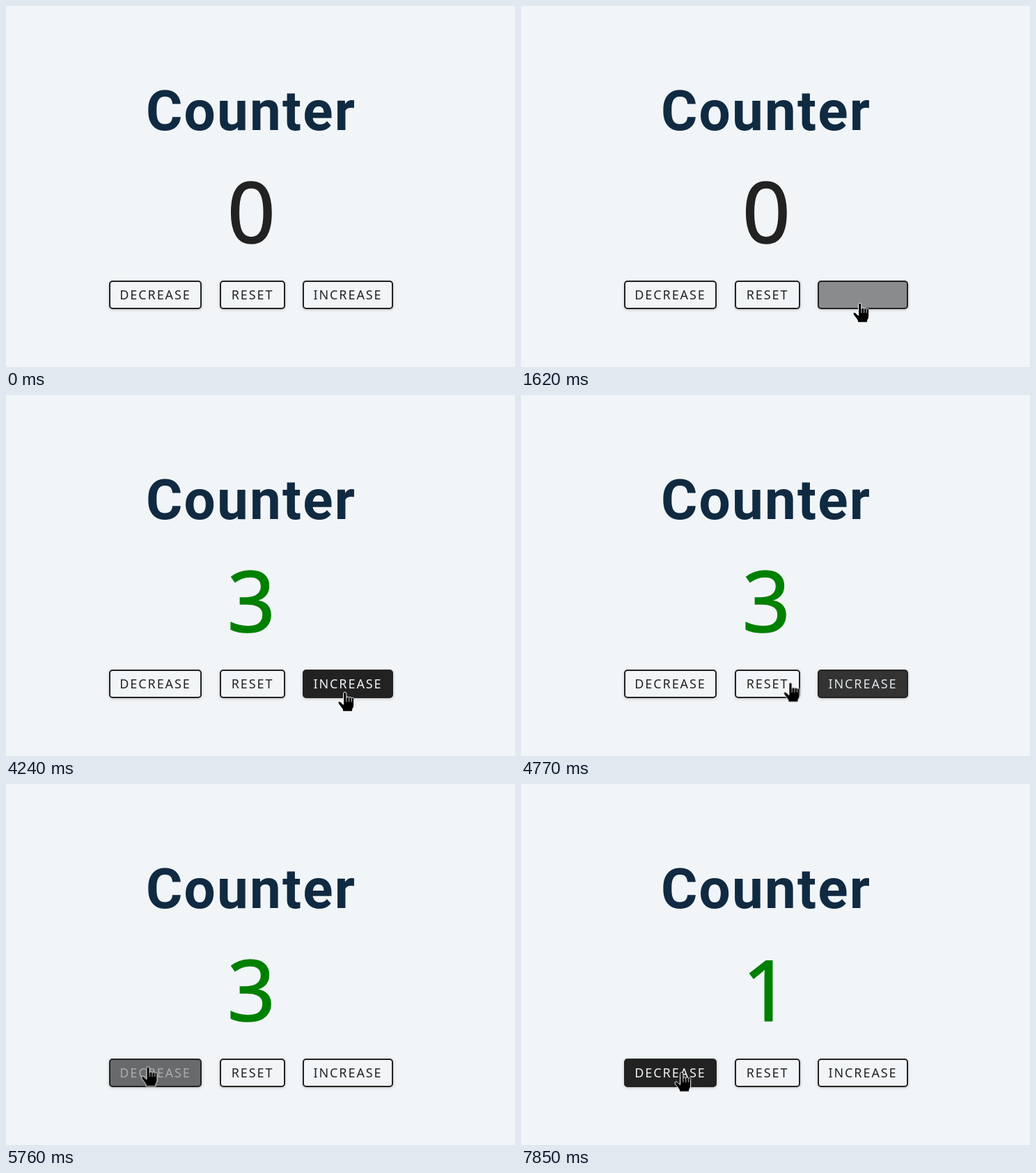
An HTML page that plays this animation: 731x518 px, repeating every 8 s.

```html
<!DOCTYPE html>
<html lang="en">
<head>
<meta charset="utf-8">
<title>Counter</title>
<style>
  :root { --paper: #f1f5f8; --ink: #222; --loop: 8s infinite; }
  html, body { margin: 0; width: 100%; height: 100%; overflow: hidden; background: var(--paper); }
  svg { position: absolute; left: 0; top: 0; }
  text { text-anchor: middle; }

  .title { font: 700 80px Roboto, sans-serif; letter-spacing: 2.2px; fill: #102a42; }
  .digit {
    font: 121px "Noto Sans", sans-serif;
    fill: green; stroke: green; stroke-width: 1.5px;
  }
  .zero { fill: var(--ink); stroke: var(--ink); }

  .btn {
    position: absolute; top: 394px; height: 41px;
    box-sizing: border-box; padding: 0 0 1px;
    display: flex; align-items: center; justify-content: center;
    border: 2px solid var(--ink); border-radius: 5px;
    background: var(--paper); color: var(--ink);
    box-shadow: 0 1px 4px rgba(0, 0, 0, .2);
    font: 18px "Noto Sans", sans-serif; letter-spacing: 1.9px;
  }
  .dec { left: 148px; width: 133px; animation: dec var(--loop) linear; }
  .reset { left: 307px; width: 94px; animation: reset var(--loop) linear; }
  .inc { left: 426px; width: 130px; animation: inc var(--loop) linear; }

  /* Hover fades */
  @keyframes inc {
    0%, 16.3%, 66.875%, 100% { background: var(--paper); color: var(--ink); }
    24.2%, 59% { background: var(--ink); color: var(--paper); }
  }
  @keyframes reset {
    0%, 59.625%, 71.125%, 100% { background: var(--paper); color: var(--ink); }
    65.375% { background: rgb(90, 91, 92); color: rgb(185, 188, 190); }
  }
  @keyframes dec {
    0%, 66.8% { background: var(--paper); color: var(--ink); }
    74.7%, 100% { background: var(--ink); color: var(--paper); }
  }

  /* Hard switches */
  .zero { animation: zero var(--loop) step-end; }
  .one { animation: one var(--loop) step-end; }
  .two { animation: two var(--loop) step-end; }
  .three { animation: three var(--loop) step-end; }
  .arrow { animation: arrow var(--loop) step-end; }
  .beam { animation: beam var(--loop) step-end; }
  .hand { animation: hand var(--loop) step-end; }
  .press { animation: press var(--loop) step-end; }

  @keyframes zero { 0% { opacity: 1; } 27.625%, 100% { opacity: 0; } }
  @keyframes one {
    0%, 40.875% { opacity: 0; }
    27.625%, 98.125%, 100% { opacity: 1; }
  }
  @keyframes two {
    0%, 53%, 98.125%, 100% { opacity: 0; }
    40.875%, 87.125% { opacity: 1; }
  }
  @keyframes three { 0%, 87.125%, 100% { opacity: 0; } 53% { opacity: 1; } }

  @keyframes arrow { 0%, 16.125%, 100% { opacity: 0; } 6.25% { opacity: 1; } }
  @keyframes beam {
    0%, 59.625%, 66.8%, 100% { opacity: 0; }
    59%, 65.375% { opacity: 1; }
  }
  @keyframes hand {
    0%, 59%, 65.375% { opacity: 0; }
    16.125%, 59.625%, 66.8%, 100% { opacity: 1; }
  }
  @keyframes press {
    0%, 27.625%, 40.875%, 53%, 87.125%, 98.125%, 100% { opacity: 0; }
    26.25%, 38.25%, 50.5%, 85.25%, 96.5% { opacity: .5; }
  }

  .pointer { animation: travel var(--loop) linear; }
  @keyframes travel {
    0%, 6.25% { transform: translate(556px, 522px); }
    11.25% { transform: translate(522px, 474px); }
    16.125% { transform: translate(488px, 435px); }
    17.5%, 56.5% { transform: translate(486.5px, 426px); }
    59% { transform: translate(426px, 416px); }
    59.625% { transform: translate(387px, 412.5px); }
    65.375% { transform: translate(307px, 411px); }
    66.375% { transform: translate(292.5px, 411px); }
    66.8% { transform: translate(281px, 410px); }
    70% { transform: translate(215px, 406px); }
    76%, 77.25% { transform: translate(182px, 405px); }
    78%, 80.86% { transform: translate(237px, 405px); }
    80.875% { transform: translate(234.5px, 407.5px); }
    83.375%, 100% { transform: translate(230.5px, 413.5px); }
  }
</style>
</head>
<body>
<div class="btn dec">DECREASE</div>
<div class="btn reset">RESET</div>
<div class="btn inc">INCREASE</div>

<svg width="731" height="518" viewBox="0 0 731 518">
  <text class="title" x="352" y="178">Counter</text>
  <text class="digit zero" x="352.3" y="339.7">0</text>
  <text class="digit one" x="352.3" y="339.7">1</text>
  <text class="digit two" x="352.3" y="339.7">2</text>
  <text class="digit three" x="352.3" y="339.7">3</text>

  <g class="pointer">
    <path class="arrow" d="M0 0V20L4.6 15.8 7.8 23 11 21.6 7.9 14.6H14Z" stroke="#fff"/>
    <path class="beam" d="M-5.5-15H5.5V-13L1.5-8H-1.5L-5.5-13ZM-5.5 15H5.5V13L1.5 8H-1.5L-5.5 13Z"/>
    <g class="hand" transform="translate(.5 0)" stroke="#fff" stroke-linejoin="round">
      <path d="M-2.5 2.5a2.2 2.2 0 0 1 4.4 0V8.5a1.9 1.7 0 0 1 3.8 .3a1.8 1.6 0 0 1 3.6 .6a1.7 1.6 0 0 1 3.4 1.2V19q0 3.5-2 5.5V28H-3.5v-2.5q-1-2-3-4.5l-3-4q-1.5-2.5 .5-3.2q2-.6 3.5 1.4l3 3z"/>
      <path d="M1.9 8.5v6M5.7 9v5.5M9.3 10v4.5" stroke-width=".8"/>
    </g>
    <circle class="press" cx="-.5" r="15" fill="#ff0"/>
  </g>
</svg>
</body>
</html>
```
